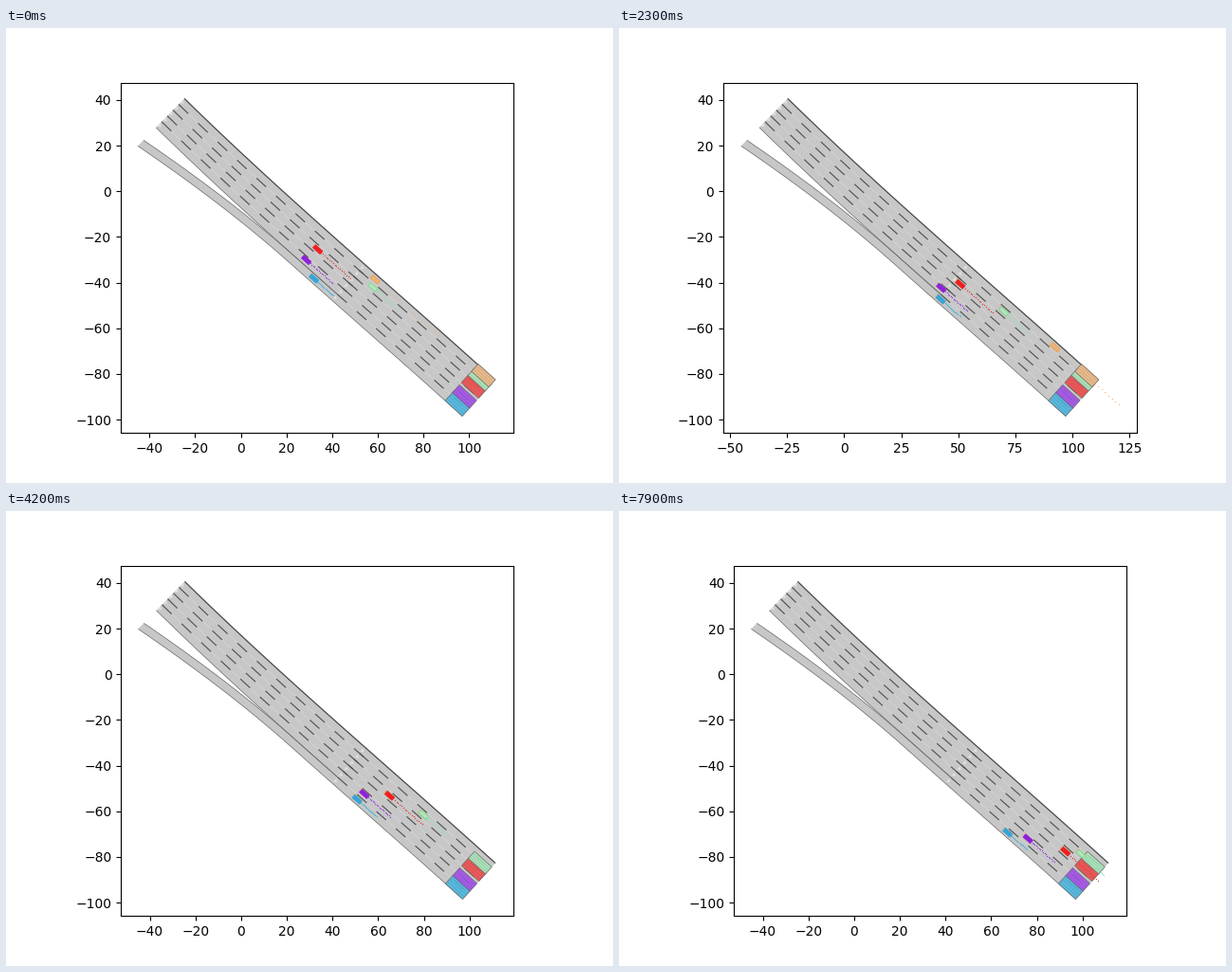
A matplotlib script that plays this animation: 640x480 px, repeating every 8000 ms.

```python
import numpy as np
import matplotlib.pyplot as plt
from matplotlib.animation import FuncAnimation
from matplotlib.collections import LineCollection
from matplotlib.patches import Polygon

FRAMES, STEP = 80, 0.1
EXIT = 3.35                          # the fast car leaves with its goal
X0, MERGE, X1 = -24.7, 54.0, 111.3   # stations along the upper road edge
LANE = 3.55
DASH, PERIOD = 4.2, 8.5
AHEAD = STEP * np.arange(20)         # planned states of each car

fig, ax = plt.subplots(figsize=(6.4, 4.8), dpi=100)
ax.set_aspect("equal")


def road(x, d):
    """Point at station x, offset d to the right of the upper road edge."""
    x = np.asarray(x, float)
    f = (x - X0) / (X1 - X0)
    y = 40.6 - .907 * (x - X0) - 10 * f * (1 - f) ** 2
    slope = .907 + 10 * (1 - f) * (1 - 3 * f) / (X1 - X0)
    size = np.hypot(1, slope)
    return np.column_stack([x - d * slope / size, y - d / size])


def fill(points, color, **kw):
    return ax.add_patch(Polygon(points, fc=color, **{"lw": 0, "zorder": 1, **kw}))


def lines(segments, color, lw, z=3, **kw):
    group = LineCollection(segments, colors=color, linewidths=lw, zorder=z, **kw)
    return ax.add_collection(group, autolim=False)


def strip(x, d0, d1, color="#c7c7c7", **kw):
    return fill(np.vstack([road(x, d0), road(x, d1)[::-1]]), color, **kw)


def draw_road():
    whole = np.linspace(X0, X1, 60)
    before = np.linspace(X0, MERGE, 40)
    after = np.linspace(MERGE, X1, 30)
    strip(before, 0, 5 * LANE)
    strip(after, 0, 6 * LANE)

    # The ramp closes its gap to the main road quadratically.
    gap = 7.8 * np.clip(1 - (before - X0) / 61, 0, 1) ** 2
    top, low = 5 * LANE + gap, 6 * LANE + gap
    strip(before, top, low)

    for i in range(1, 6):
        first = X0 if i < 5 else MERGE
        lines([road(whole[whole >= first], i * LANE)], "#d6d6d6", .5, 2)
        starts = list(np.arange(MERGE, X1, PERIOD))
        if i < 5:
            starts += list(np.arange(X0, MERGE, PERIOD))
        lines([road([x, x + DASH], i * LANE) for x in starts], "#4c4c4c", .8)

    lines([road(whole, 0)], "#484848", .9)
    lines([road(before, 5 * LANE), road(before, top), road(before, low),
           road(after, 6 * LANE)], "#666666", .5)

    # Pale direction marks where lanes begin.
    for x, count in ((X0, 5), (MERGE, 6)):
        for i in range(count):
            base = road([x, x], LANE * (i + np.array([.25, .75])))
            tip = road([x + 1], LANE * (i + .5))
            fill(np.vstack([base, tip]), "#e2e2e2", zorder=2)


def goal(d0, d1, color, z):
    """Goal box at the road's end, between two offsets."""
    x = np.array([X1 - 7.6, X1])
    box = strip(x, d0, d1, color, ec="#666666", lw=.5, alpha=.93, zorder=z)
    rows = [road(x, d) for d in np.linspace(d0, d1, 5)[1:-1]]
    return box, lines(rows, "#555555", .4, z + .01, alpha=.25)


class Car:
    def __init__(self, x, speed, d, face, edge, dots, alpha=1):
        self.x, self.speed, self.d = x, speed, d
        empty = np.zeros((4, 2))
        self.ghost = fill(empty, "none", ec="#f0a040", lw=.5, zorder=6)
        self.body = fill(empty, face, zorder=7, alpha=alpha)
        self.rim = fill(empty, "none", ec=edge, lw=.6, zorder=7.1)
        self.trail, = ax.plot([], [], "o", ms=.9, mew=0, color=dots, zorder=6.5)
        self.parts = [self.ghost, self.body, self.rim, self.trail]

    def path(self, t):
        return road(self.x + self.speed * t, self.d)

    def box(self, t, length, width):
        x = self.x + self.speed * t
        half = length / 2 * .741
        a, b = self.d - width / 2, self.d + width / 2
        return road(x + half * np.array([-1, 1, 1, -1]), np.array([a, a, b, b]))

    def move(self, t):
        self.body.set_xy(self.box(t, 4.3, 1.8))
        self.rim.set_xy(self.box(t, 4.2, 1.7))
        self.ghost.set_xy(self.box(t - .03, 4.8, 2.1))
        self.ghost.set_alpha(.4 * min(t, 1))
        self.trail.set_data(*self.path(t + AHEAD).T)

    def show(self, on):
        for part in self.parts:
            part.set_visible(on)


def fit_view(t, driving):
    x0, x1, y0, y1 = -44.8, X1, -98.9, 40.6
    if driving:
        ex, ey = orange.path(t + AHEAD[-1:])[0]
        x1, y0 = max(X1 + .3, ex), min(y0, ey)
    mx, my = .05 * (x1 - x0), .05 * (y1 - y0)
    ax.set_xlim(x0 - mx, x1 + mx)
    ax.set_ylim(y0 - my, y1 + my)


draw_road()
goal(16.3, 21.3, "#4fb8e0", 4)
goal(12.0, 16.6, "#a452ea", 4.1)
goal(6.0, 10.7, "#f05050", 4.2)
goal(2.3, 6.4, "#a9e6ba", 4.3)
exit_goal = goal(-.3, 4.0, "#efba88", 4.4)

cars = [
    Car(44.9, 4.45, 19.4, "#35a5d8", "#35a5d8", "#35b5e8"),
    Car(39.0, 6.00, 15.5, "#8f1fdc", "#8f1fdc", "#9a30ea"),
    Car(39.5, 7.45, 8.75, "#ee2020", "#ee2020", "#f03030"),
    Car(61.2, 5.27, 5.1, "#b4ecc0", "#6fe08a", "#8fe8bc", .7),
    Car(60.1, 14.6, 2.0, "#f2b070", "#f5a050", "#f5b078", .85),
]
orange = cars[-1]


def draw(i):
    t = i * STEP
    driving = t < EXIT
    for car in cars:
        car.move(t)
    orange.show(driving)
    for part in exit_goal:
        part.set_visible(driving)
    fit_view(t, driving)
    return []


anim = FuncAnimation(fig, draw, frames=FRAMES, interval=100, repeat=True,
                     repeat_delay=0, blit=False)
plt.show()
```
